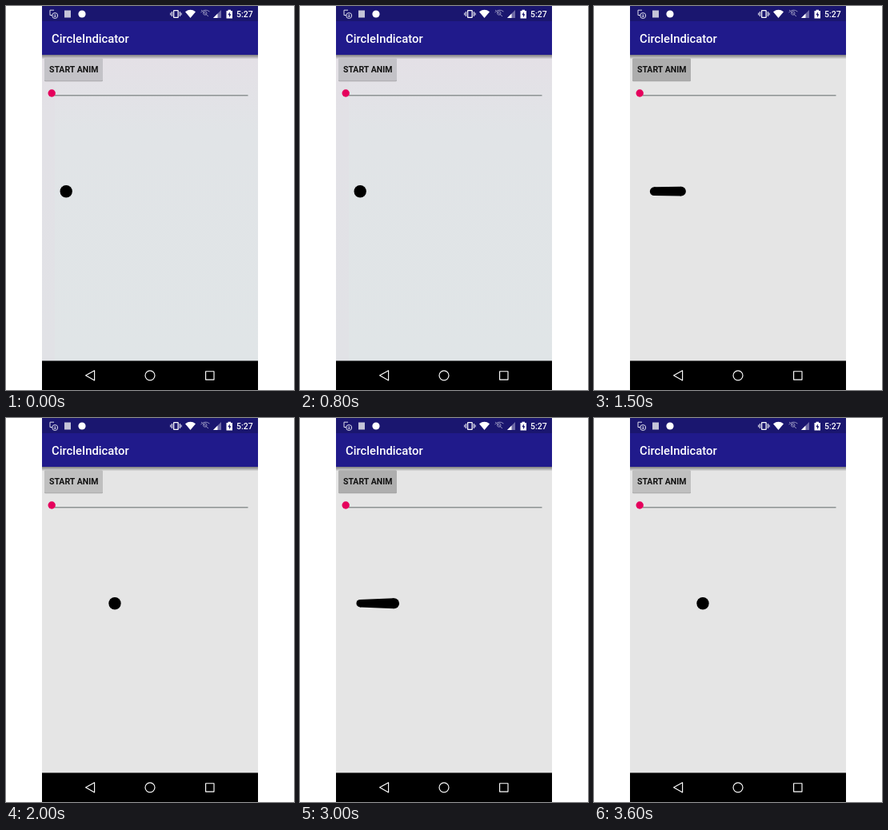
Recreate the animation shown at these times as an HTML page. Size 360x480 px, loop 3.7 s.

```html
<!DOCTYPE html>
<html lang="en">
<head>
<meta charset="utf-8">
<title>CircleIndicator</title>
<style>
  html, body { margin: 0; width: 100%; height: 100%; overflow: hidden; background: #fff; }
  svg { display: block; width: 360px; height: 480px; }
  text { font-family: Roboto, "Noto Sans", sans-serif; font-weight: 500; }
  .tint { animation: tint 3.7s step-end infinite; }
  .face { animation: face 3.7s step-end infinite; }
  .lift { animation: lift 3.7s step-end infinite; }

  @keyframes tint {
    0% { opacity: 1 }
    32.43% { opacity: .5 }
    35.14%, 100% { opacity: 0 }
  }
  @keyframes face {
    0% { fill: #c3c2c7 }
    27.03% { fill: #bdbdc1 }
    32.43% { fill: #b3b3b4 }
    35.14% { fill: #adadad }
    43.24% { fill: #b5b5b5 }
    45.95% { fill: #bfbfbf }
    70.27% { fill: #bbbbbb }
    72.97% { fill: #b2b2b2 }
    75.68% { fill: #aeaeae }
    83.78% { fill: #b6b6b6 }
    86.49%, 100% { fill: #bfbfbf }
  }
  @keyframes lift {
    0% { opacity: 0 }
    27.03% { opacity: 1 }
    35.14% { opacity: 0 }
    70.27% { opacity: 1 }
    75.68%, 100% { opacity: 0 }
  }
</style>
</head>
<body>
<svg viewBox="0 0 360 480">
  <defs>
    <linearGradient id="cool" x2="0" y2="1">
      <stop offset="0" stop-color="#e4e0e6"/>
      <stop offset=".25" stop-color="#e1e4e7"/>
      <stop offset="1" stop-color="#e0e5e7"/>
    </linearGradient>
    <linearGradient id="drop" x2="0" y2="1">
      <stop offset="0" stop-color="#000" stop-opacity=".45"/>
      <stop offset="1" stop-color="#000" stop-opacity="0"/>
    </linearGradient>
    <filter id="soft" x="-10%" y="-20%" width="120%" height="150%">
      <feGaussianBlur stdDeviation="1"/>
    </filter>
  </defs>

  <!-- page -->
  <rect x="45" y="61" width="270" height="383" fill="#e5e5e5"/>
  <g class="tint">
    <rect x="45" y="61" width="270" height="383" fill="url(#cool)"/>
    <rect x="45" y="61" width="16" height="383" fill="#e4dfe6" opacity=".5"/>
  </g>

  <!-- bars -->
  <rect x="45" y="61" width="270" height="5.5" fill="url(#drop)"/>
  <rect x="45" y="19" width="270" height="42" fill="#201a8b"/>
  <rect x="45" width="270" height="19" fill="#1a166f"/>
  <text x="57" y="46" font-size="14.8" fill="#fff">CircleIndicator</text>

  <!-- status icons -->
  <g fill="none" stroke="#dcdcec">
    <path d="M60 5.2h-5v6.3h3" stroke-width="1"/>
    <circle cx="61.2" cy="12" r="3.5"/>
    <path d="M61.2 9.8v4M59.7 12.3l1.5 1.5 1.5-1.5" stroke-width=".9"/>
  </g>
  <rect x="73" y="5.5" width="8" height="9" fill="#c4c4d8"/>
  <circle cx="95" cy="10" r="4.6" fill="#fff"/>

  <g fill="none" stroke="#fff">
    <rect x="209.6" y="5.6" width="5.6" height="8.8" rx=".6" stroke-width="1.3"/>
    <path d="M207.4 7v6M217.4 7v6M205.7 8.5v3M219.1 8.5v3" stroke-width="1"/>
  </g>
  <path d="M224 7.2Q230.5 2.4 237 7.2L230.5 15Z" fill="#fff"/>
  <g fill="none" stroke="#8f8dbb" stroke-width="1">
    <path d="M243.5 8Q249 2.8 254.5 7M244 5l9 8"/>
    <circle cx="248.8" cy="9" r="2.2"/>
  </g>
  <path d="M269 5v10h-10Z" fill="#6e6ba6"/>
  <path d="M264.5 9.5V15H259Z" fill="#fff"/>
  <path d="M275.5 6h2V4.7h3.5V6h2v9.5h-7.5Z" fill="#fff"/>
  <path d="M279.8 7.2l-2.4 4h1.6v3l2.4-4h-1.6Z" fill="#1a166f"/>
  <text x="288" y="14" font-size="10.5" fill="#fff">5:27</text>

  <!-- button -->
  <rect x="48" y="66" width="73" height="28.3" rx="1.5" opacity=".3"/>
  <g class="lift"><rect x="48" y="67" width="73.5" height="28.5" rx="2" opacity=".35" filter="url(#soft)"/></g>
  <rect class="face" x="48" y="65.2" width="73" height="28.3" rx="1.5"/>
  <text x="54" y="83.2" font-size="10.5" style="font-weight: 700" fill="#111">START ANIM</text>

  <!-- slider -->
  <rect x="61" y="111" width="241.5" height="1.5" fill="#8d9393"/>
  <circle cx="57.2" cy="109" r="4.7" fill="#e5005c"/>

  <!-- spring dot -->
  <circle id="foot" cy="231.7"/>
  <circle id="head" cy="231.7"/>
  <path id="neck"/>

  <!-- navigation -->
  <rect x="45" y="443.5" width="270" height="36.5"/>
  <g fill="none" stroke="#fff" stroke-width="1.15" stroke-linejoin="round">
    <path d="M110.6 455.7v12.2L99.6 461.8Z"/>
    <circle cx="180" cy="461.8" r="6"/>
    <rect x="249.6" y="456.7" width="10.4" height="10.4"/>
  </g>
</svg>
<script>
  const LOOP = 3700, STEP = 100, RUN = 800;
  const FIRST = 1217, SECOND = 2678;
  const LEFT = 75.2, RIGHT = 136, Y = 231.7;
  const BIG = 7.7, SMALL = 3.5;
  const el = id => document.getElementById(id);
  const foot = el('foot'), head = el('head'), neck = el('neck');
  const clamp = v => Math.min(1, Math.max(0, v));
  const mix = (a, b, u) => a + (b - a) * u;
  const ease = x => (1 - Math.cos(Math.PI * x)) / 2;

  function place(circle, x, r) {
    circle.setAttribute('cx', x);
    circle.setAttribute('r', r);
  }

  // Outer tangents of the two circles
  function bridge(x1, r1, x2, r2) {
    const d = x2 - x1;
    if (d <= Math.abs(r2 - r1)) return '';
    const c = (r1 - r2) / d, s = Math.sqrt(1 - c * c);
    const at = (x, r, side) => `${x + r * c} ${Y + side * r * s}`;
    return `M${at(x1, r1, -1)}L${at(x2, r2, -1)}L${at(x2, r2, 1)}L${at(x1, r1, 1)}Z`;
  }

  function draw(ms) {
    const t = Math.floor(ms % LOOP / STEP) * STEP;
    const p = ease(clamp((t - (t < SECOND ? FIRST : SECOND)) / RUN));
    const lead = clamp(p * 2), trail = clamp(p * 2 - 1);
    const x1 = mix(LEFT, RIGHT, trail), r1 = mix(BIG, SMALL, lead);
    const x2 = mix(LEFT, RIGHT, lead), r2 = mix(SMALL, BIG, lead);
    place(foot, x1, r1);
    place(head, x2, r2);
    neck.setAttribute('d', bridge(x1, r1, x2, r2));
  }

  const start = performance.now();
  function tick() {
    draw(performance.now() - start);
    requestAnimationFrame(tick);
  }
  tick();
</script>
</body>
</html>
```
